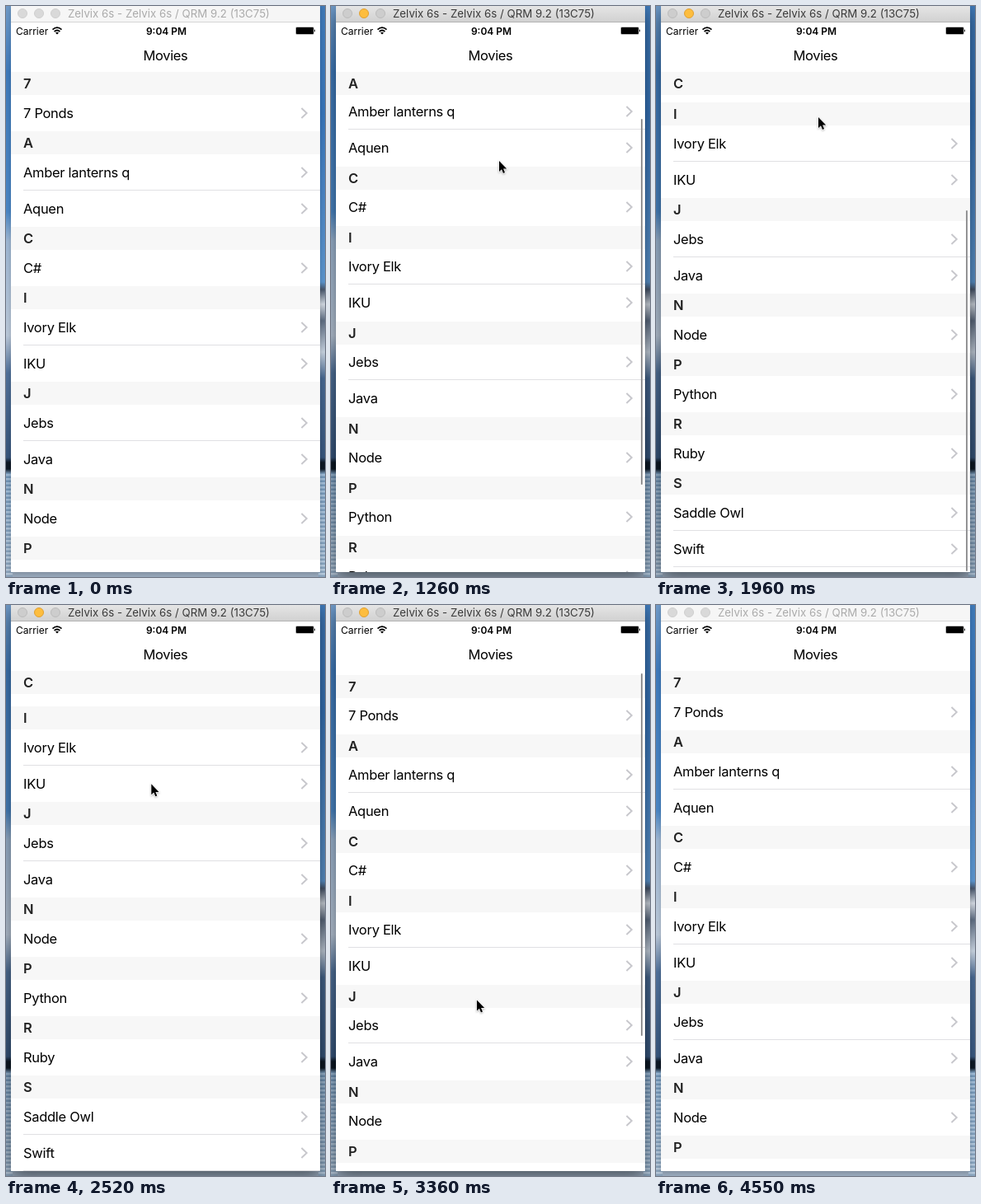
An HTML page for the animation above (4.62 s loop, 387x693 px).

```html
<!DOCTYPE html>
<html lang="en">
<head>
<meta charset="utf-8">
<title>Movies</title>
<style>
html, body { margin: 0; width: 100%; height: 100%; overflow: hidden; }
body { font-family: Inter, "Liberation Sans", sans-serif; color: #000; }
#stage { position: relative; width: 387px; height: 693px; overflow: hidden; background: #9aabbe; }
#stage div, #stage svg, #stage span { position: absolute; white-space: nowrap; }
.sky { top: 0; width: 8px; height: 693px; }
.sky::after { content: ""; position: absolute; inset: 568px 0 0; background: repeating-linear-gradient(#fff3 0 2px, #2463 3px 5px); }
.left { left: 0; background: linear-gradient(#6f9ac8, #3f7abb 80px, #4a86c4 250px, #9db6d2 285px, #b9c7d8 400px,
  #4f7099 445px, #36547a 548px, #0d1825 554px, #0d1825 562px, #7fa3c6 568px, #a3b8cd); }
.right { right: 0; background: linear-gradient(#3f79b8, #3673b8 130px, #5b93cb 335px, #48566b 344px, #cfd6df 362px,
  #5c6b80 382px, #c3cedb 420px, #44648c 452px, #36547a 548px, #0d1825 554px, #0d1825 562px, #85a8ca 568px, #a3bcd4); }
#win { left: 6px; top: -1px; width: 375px; height: 688px; background: #fff; box-shadow: 0 2px 6px rgba(0,0,0,.2); }
#win.active { box-shadow: 0 8px 20px rgba(0,0,0,.5); }
#bar { left: 0; top: 0; width: 375px; height: 20px; background: #f6f6f6; border-bottom: 1px solid #d6d6d6; color: #ababab; }
.active #bar { background: linear-gradient(#e6e6e6, #d1d1d1); border-color: #b3b3b3; color: #3b3b3b; }
#bar i { position: absolute; top: 4px; width: 10px; height: 10px; border: 1px solid #cfcfcf; border-radius: 50%; background: #d9d9d9; }
.active #bar i { background: #cdcdcd; border-color: #bcbcbc; }
.active #bar i.on { background: #fdbd3e; border-color: #e0a032; }
#bar span { left: 69px; top: 0; font-size: 13.3px; line-height: 21px; }
#carrier { left: 12px; top: 20px; font-size: 12px; line-height: 21px; }
#clock { left: 7px; width: 375px; top: 20px; text-align: center; font-size: 12px; line-height: 21px; font-weight: 600; }
#nav { left: 6px; width: 375px; top: 40px; line-height: 40px; text-align: center; font-size: 16.5px; letter-spacing: -.35px; }
#list { left: 6px; top: 80px; width: 375px; height: 607px; overflow: hidden; font-size: 16.5px; letter-spacing: -.3px; }
.row, .head { left: 0; width: 360px; padding-left: 15px; }
.row { height: 44px; line-height: 44px; }
.row.line::after { content: ""; position: absolute; left: 15px; right: 0; bottom: 0; height: 1px; background: #e0e0e3; }
.row svg { left: 351px; top: 15px; }
.head { height: 28px; line-height: 29px; background: #f7f7f7; font-weight: 600; color: #222; }
#thumb { left: 369.5px; width: 2.5px; border-radius: 2px; background: #939395; }
#cursor { left: 0; top: 0; overflow: visible; filter: drop-shadow(0 1px 1px rgba(0,0,0,.3)); }
</style>
</head>
<body>
<div id="stage">
  <div class="sky left"></div><div class="sky right"></div>
  <div id="win"><div id="bar">
    <i style="left:8px"></i><i class="on" style="left:28px"></i><i style="left:48px"></i>
    <span>Zelvix 6s - Zelvix 6s / QRM 9.2 (13C75)</span>
  </div></div>
  <div id="carrier">Carrier</div>
  <svg style="left:55px;top:24px" width="14" height="12" fill="none" stroke="#000" stroke-width="1.7">
    <path d="M1.5 4.6Q7 -.2 12.5 4.6M3.6 7Q7 4 10.4 7"/><path d="M7 10.5L5 8.6Q7 7 9 8.6Z" fill="#000" stroke="none"/>
  </svg>
  <div id="clock">9:04 PM</div>
  <svg style="left:351px;top:25px" width="25" height="11">
    <rect x=".5" y=".5" width="22" height="9" rx="1.5" fill="#fff" stroke="#999" stroke-width=".6"/>
    <rect x="1" y="1" width="21" height="8" rx=".8"/><path d="M23 3.3Q25 5 23 6.7Z"/>
  </svg>
  <div id="nav">Movies</div>
  <div id="list"></div>
  <svg id="cursor" width="11" height="17">
    <path d="M0 0V13L3 10.3 5 15 7 14.1 5.1 9.6H9.2Z" stroke="#fff" stroke-width="1.2" paint-order="stroke"/>
  </svg>
</div>
<script>
const LOOP = 4620, STEP = 70, HEAD = 28, ROW = 44, VIEW = 607;
const sections = {
  7: ["7 Ponds"], A: ["Amber lanterns q", "Aquen"], C: ["C#"], I: ["Ivory Elk", "IKU"],
  J: ["Jebs", "Java"], N: ["Node"], P: ["Python"], R: ["Ruby"], S: ["Saddle Owl", "Swift"]
};
const $ = id => document.getElementById(id);
const list = $("list"), rows = [], heads = [];
const chevron = '<svg width="10" height="14" fill="none" stroke="#c7c7cc" stroke-width="1.9"><path d="M1.5 1L7.8 7 1.5 13"/></svg>';

function add(cls, html) {
  const el = document.createElement("div");
  el.className = cls;
  el.innerHTML = html;
  list.append(el);
  return el;
}

let total = 0;
const groups = Object.entries(sections);
groups.forEach(([letter, items], n) => {
  heads.push({ letter, y: total });
  total += HEAD;
  items.forEach((name, k) => {
    const line = k < items.length - 1 || n === groups.length - 1;
    rows.push({ y: total, el: add(line ? "row line" : "row", name + chevron) });
    total += ROW;
  });
});
heads.forEach(h => h.el = add("head", h.letter));
const thumb = add("", "");
thumb.id = "thumb";
const MAX = total - VIEW;

// Moments of the two gestures
const FOCUS = 560, FLICK = 823, PEAK = 1960, REST = 2310, GRAB = 2940, RELEASE = 3593, HOME = 4131, BLUR = 4480;
const OVERSHOOT = 6, PULL = 318;

// Eased progress from 0 to 1 between two times
function ease(t, from, to) {
  const u = Math.min(Math.max((t - from) / (to - from), 0), 1);
  return u * u * (3 - 2 * u);
}

// Resistance of the list when pulled past its end
const rubber = d => VIEW * (1 - 1 / (d * .55 / VIEW + 1));

function scrollAt(t) {
  if (t < GRAB) return (MAX + OVERSHOOT) * ease(t, FLICK, PEAK) - OVERSHOOT * ease(t, PEAK, REST);
  const s = MAX - PULL * ease(t, GRAB, RELEASE);
  return s > 0 ? s : -rubber(-s) * (1 - ease(t, RELEASE, HOME));
}

// Pointer moves: begin, end, x, y
const moves = [
  [70, FOCUS, 214, 262], [FOCUS, 1260, 204, 188], [1260, PEAK, 197, 135], [PEAK, REST, 192, 84],
  [REST, 2610, 172, 254], [GRAB, RELEASE, 179, 254 + PULL], [RELEASE, 3850, 166, 572], [3850, BLUR, 374, 690]
];

function pointerAt(t) {
  let x = 374, y = 680;
  for (const [from, to, toX, toY] of moves) {
    const e = ease(t, from, to);
    x += (toX - x) * e;
    y += (toY - y) * e;
  }
  return [x, y];
}

function draw(t) {
  const s = Math.round(scrollAt(t) * 2) / 2;
  rows.forEach(r => r.el.style.top = Math.floor(r.y - s) + "px");
  heads.forEach((h, n) => {
    const next = heads[n + 1] ? heads[n + 1].y - s - HEAD : Infinity;
    h.el.style.top = Math.ceil(Math.min(Math.max(h.y - s, 0), next)) + "px";
  });

  // The indicator shrinks against its end while the list is overscrolled
  const track = VIEW - 4;
  const size = track * VIEW / total - Math.max(-s, s - MAX, 0);
  const part = Math.min(Math.max(s / MAX, 0), 1);
  const fade = from => ease(t, from, from + 2 * STEP);
  thumb.style.top = 3 + part * (track - size) + "px";
  thumb.style.height = size + "px";
  thumb.style.opacity = fade(FOCUS) - fade(REST) + fade(GRAB) - fade(HOME);

  $("win").classList.toggle("active", t >= FOCUS && t < BLUR);
  const [x, y] = pointerAt(t);
  $("cursor").style.visibility = t >= STEP && t < LOOP - STEP ? "visible" : "hidden";
  $("cursor").style.transform = `translate(${x}px, ${y}px)`;
}

const start = performance.now();
function tick() {
  const t = (performance.now() - start) % LOOP;
  draw(Math.floor(t / STEP) * STEP);
  requestAnimationFrame(tick);
}
tick();
</script>
</body>
</html>
```
